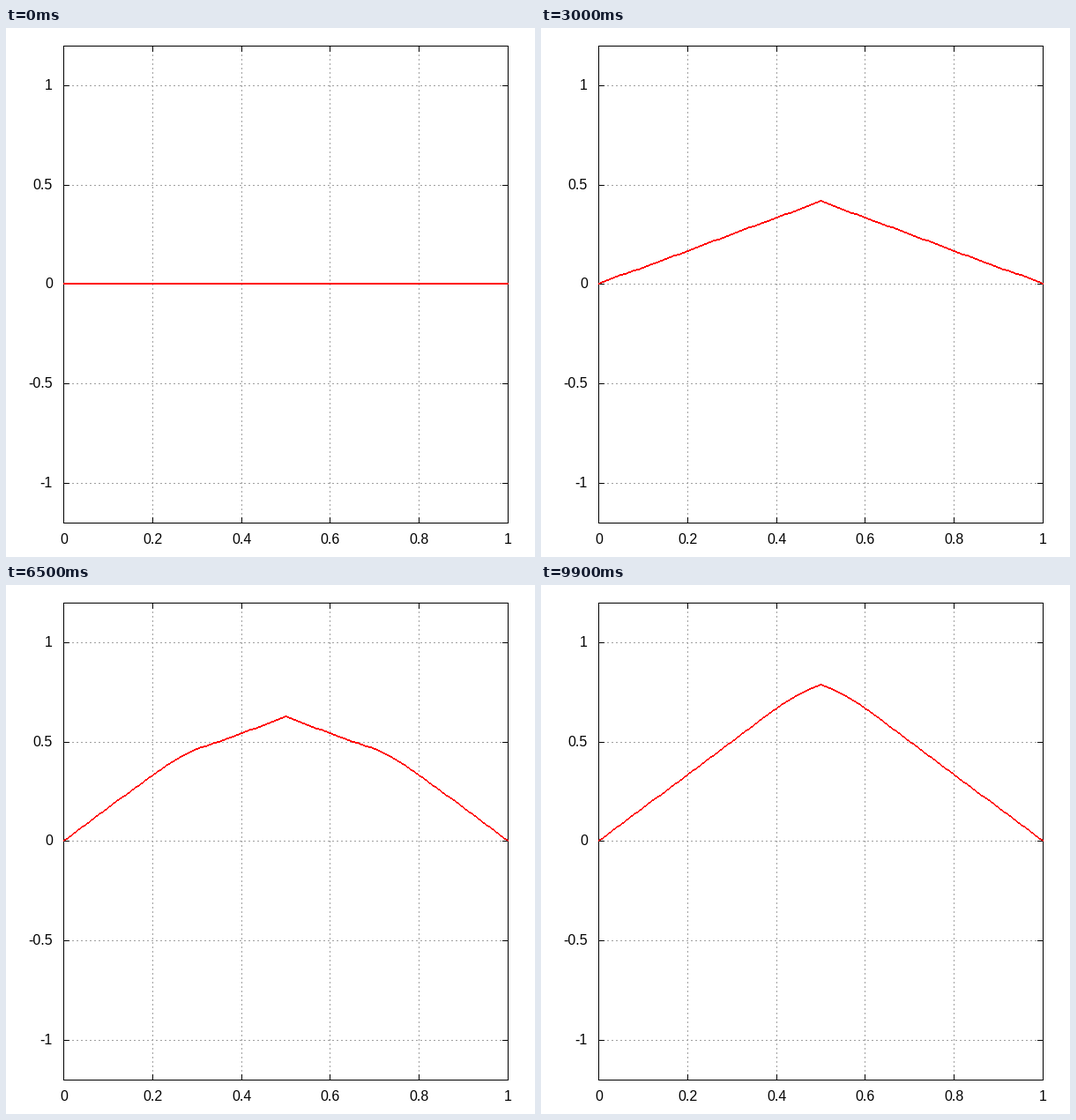
Animation of 600x600 px, one loop 10000 ms. Source, as a matplotlib script:

```python
import numpy as np
import matplotlib.pyplot as plt
from matplotlib.animation import FuncAnimation

plt.rcParams["text.hinting"] = "native"

SIZE, DPI = 600, 100
PX = 72 / DPI                            # one pixel in points
LEFT, RIGHT, TOP, BOTTOM = 65, 569, 20, 561
X_SCALE, Y_SCALE = RIGHT - LEFT, (BOTTOM - TOP) / 2.4
ZERO = 290.32
TICK = 7
FRAMES, INTERVAL = 100, 100

# String on fixed ends, pushed by a constant force at its middle from rest.
CELLS, SPEED, DAMPING = 100, 0.5, 2.5e-4
SLOPE = 5 / 6
x = np.linspace(0, 1, CELLS + 1)
rest = SLOPE * np.minimum(x, 1 - x)
modes = np.arange(1, CELLS, 2)
shapes = np.sin(np.pi * np.outer(modes, x))
weights = 2 / CELLS * shapes @ rest
omega = 2 * SPEED * CELLS * np.sin(modes * np.pi / (2 * CELLS))
decay = DAMPING * omega ** 2

columns = np.arange(LEFT, RIGHT + 1)
nodes = np.rint(LEFT + X_SCALE * x)


def string_rows(t):
    """Pixel row of the string in each column."""
    swing = np.exp(-decay * t) * np.cos(omega * t)
    u = (weights * (1 - swing)) @ shapes
    rows = np.rint(ZERO - Y_SCALE * u)
    return np.rint(np.interp(columns, nodes, rows))


fig = plt.figure(figsize=(SIZE / DPI, SIZE / DPI), dpi=DPI, facecolor="white")
ax = fig.add_axes([0, 0, 1, 1])
ax.set_xlim(0, SIZE)
ax.set_ylim(SIZE, 0)
ax.axis("off")

SOLID = dict(color="black", zorder=2)
GRID = dict(color="#a0a0a0", zorder=1, linestyle=(0, (2, 3)))


def rule(xs, ys, style):
    ax.plot(xs, ys, lw=PX, snap=False, solid_capstyle="butt",
            dash_capstyle="butt", **style)


def hline(row, x0, x1, style=SOLID):
    rule([x0, x1], [row + 0.5] * 2, style)


def vline(col, y0, y1, style=SOLID):
    rule([col + 0.5] * 2, [y0, y1], style)


def label(px, py, value, align):
    ax.text(px, py, f"{value:g}", ha=align, va="baseline",
            family="Liberation Sans", fontsize=16 * PX, color="black")


for value in (0, 0.2, 0.4, 0.6, 0.8, 1):
    col = round(LEFT + X_SCALE * value)
    if 0 < value < 1:
        vline(col, BOTTOM + 1, TOP, GRID)
    vline(col, BOTTOM + 1, BOTTOM + 1 - TICK)
    vline(col, TOP, TOP + TICK)
    label(col + 0.5, 585, value, "center")

for value in (-1, -0.5, 0, 0.5, 1):
    row = round(ZERO - Y_SCALE * value)
    hline(row, LEFT, RIGHT + 1, GRID)
    hline(row, LEFT, LEFT + TICK)
    hline(row, RIGHT + 1 - TICK, RIGHT + 1)
    label(53, row + 5, value, "right")

for col in (LEFT, RIGHT):
    vline(col, TOP, BOTTOM + 1)
for row in (TOP, BOTTOM):
    hline(row, LEFT, RIGHT + 1)

# The string is two pixels tall in every column.
start = string_rows(0)
string = ax.stairs(start + 1, np.append(columns, RIGHT + 1),
                   baseline=start - 1, fill=True, color="#ff0000",
                   linewidth=0, snap=False, zorder=3)
ax.set_xlim(0, SIZE)
ax.set_ylim(SIZE, 0)


def update(frame):
    rows = string_rows(frame * INTERVAL / 1000)
    string.set_data(values=rows + 1, baseline=rows - 1)
    return string,


anim = FuncAnimation(fig, update, frames=FRAMES, interval=INTERVAL,
                     repeat=True, repeat_delay=0)
plt.show()
```
